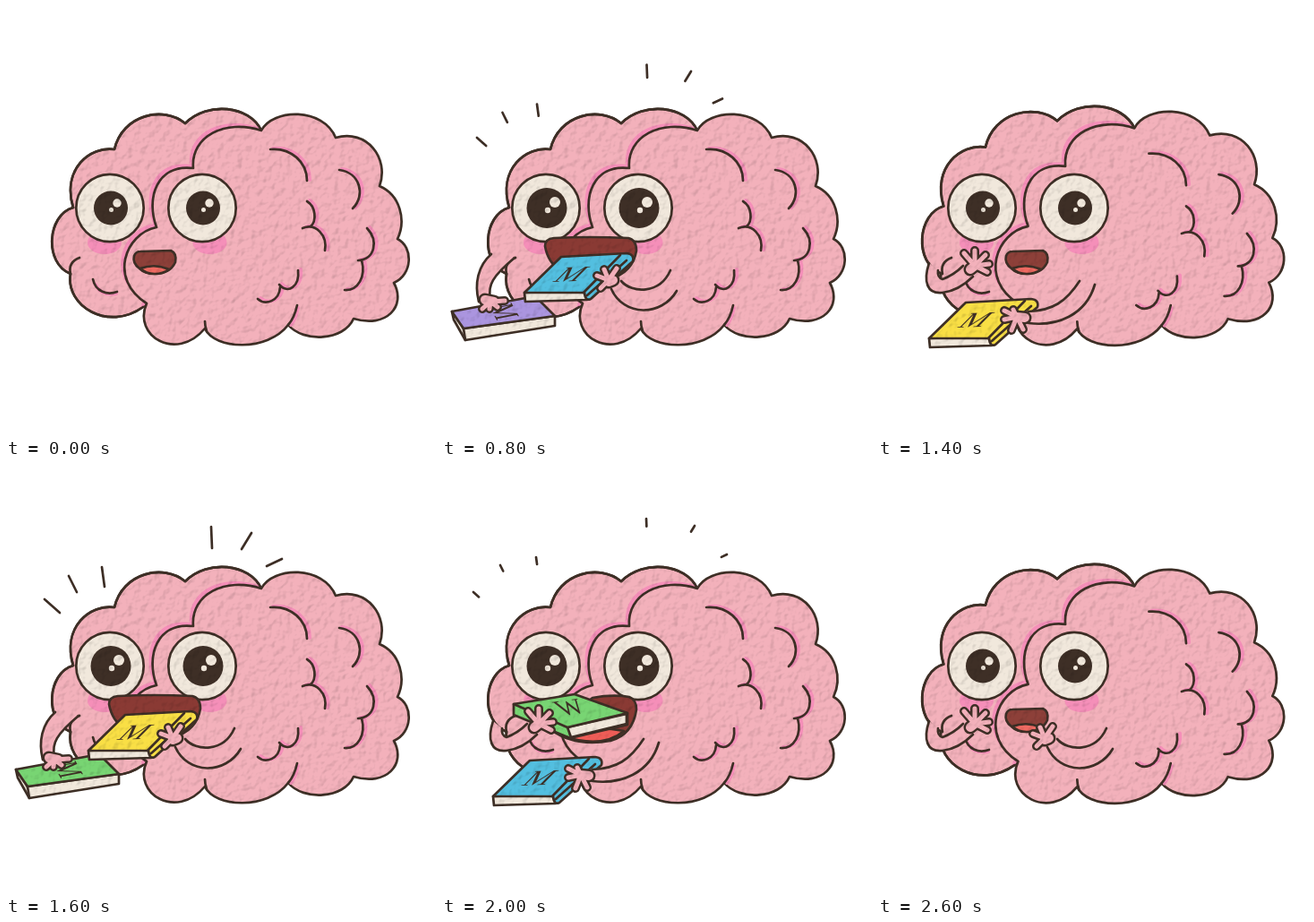
An HTML page that plays this animation: 480 by 480 pixels, repeating every 2.8 s.

```html
<!DOCTYPE html>
<html lang="en">
<head>
<meta charset="utf-8">
<title>Hungry brain</title>
<style>
  html, body { margin: 0; width: 100%; height: 100%; overflow: hidden; background: #fff; }
  svg { display: block; width: 100vw; height: 100vh; }
  path, circle { stroke-linecap: round; stroke-linejoin: round; }
  .ink { fill: none; stroke: #3e2f26; stroke-width: 2.7; }
  .shape { stroke: #3e2f26; stroke-width: 2.7; }
  .shade { fill: none; stroke: #f58fb9; stroke-width: 4; }
  text { font: 29px "Liberation Serif", serif; fill: #3e2f26; text-anchor: middle; }
</style>
</head>
<body>
<svg viewBox="0 0 480 480">
  <defs>
    <filter id="paper" filterUnits="userSpaceOnUse" x="0" y="0" width="480" height="480" color-interpolation-filters="sRGB">
      <feTurbulence type="fractalNoise" baseFrequency=".13" numOctaves="2" seed="4"/>
      <feDiffuseLighting surfaceScale=".6" diffuseConstant="1.2" lighting-color="#fff" result="light">
        <feDistantLight azimuth="225" elevation="56"/>
      </feDiffuseLighting>
      <feComposite in="SourceGraphic" in2="light" operator="arithmetic" k1="1"/>
    </filter>
    <clipPath id="backClip"><path id="backShape"/></clipPath>
  </defs>
  <g id="scene" filter="url(#paper)"></g>
</svg>
<script>
const PINK = '#f3b1bb', DARK = '#3e2f26', CREAM = '#f1e8dc', ROSE = '#f58fb9';
const BLUE = '#53bfe0', GREEN = '#78d573', LILAC = '#ab95df', YELLOW = '#f9df45';

const shape = (d, fill) => `<path class="shape" d="${d}" fill="${fill}"/>`;
const line = (d, cls = 'ink') => `<path class="${cls}" d="${d}"/>`;
const dot = (x, y, r, fill, cls = '') => `<circle class="${cls}" cx="${x}" cy="${y}" r="${r}" fill="${fill}"/>`;
const blush = x => `<ellipse cx="${x}" cy="264" rx="19" ry="13" fill="${ROSE}"/>`;
const letter = (char, matrix) => `<text transform="matrix(${matrix})" y="10">${char}</text>`;

// Brain
const BACK = `M285 139C272 111 225 106 200 131C176 111 130 121 121 160C94 156 62 182 75 225
  C46 233 42 287 72 299C66 335 114 364 153 336L230 250Z`;
const FRONT = `M209 181C168 176 156 215 168 247C133 254 114 305 157 332C141 368 190 398 222 360
  C233 384 292 386 315 356C332 376 377 374 388 349C425 360 447 335 433 309C454 300 455 269 437 260
  C447 239 440 211 417 201C428 170 403 137 368 147C354 113 298 114 285 139C245 126 206 145 209 181Z`;
const FOLDS = `M295 160C318 158 336 174 336 195M336 218C346 224 347 240 340 246M331 248
  C346 242 359 256 356 273M372 183C395 186 402 211 387 226M403 248C416 262 412 283 393 284M397 284
  C402 302 393 318 378 317M281 327C290 335 305 329 306 314M305 311C315 322 328 313 326 295`;
document.getElementById('backShape').setAttribute('d', BACK);

function brain(swollen) {
  const grow = swollen ? 'translate(200 330) scale(1.014) translate(-200 -330)' : '';
  const slide = swollen ? 'translate(6 7)' : '';
  return `<g transform="${grow}">` + shape(BACK, PINK) +
    `<g clip-path="url(#backClip)"><path d="${FRONT}" fill="${ROSE}" transform="translate(-4 -4)"/></g>` +
    line(BACK.replace('L230 250Z', '')) + shape(FRONT, PINK) +
    line('M326 337Q323 350 318 356', 'shade') + line('M325 334Q322 348 315 356M222 352Q222 357 224 363') +
    `<g transform="${slide}"><g transform="translate(3 -1)">${line(FOLDS, 'shade')}</g>${line(FOLDS)}</g></g>` +
    line('M100 311Q106 324 123 321', 'shade') + line('M82 281Q69 286 72 299M97 305C100 319 113 323 124 319');
}

// Face
function eye(x, wide) {
  return dot(x, 225.5, 37.7, CREAM, 'shape') + dot(x + 1, 225.5, wide ? 22.5 : 19, DARK) +
    (wide ? dot(x + 10, 219, 6, CREAM) + dot(x + 2, 228, 3.2, CREAM)
          : dot(x + 8, 220, 4.7, CREAM) + dot(x + 1.5, 227.5, 2.5, CREAM));
}

function mouth(kind) {
  if (!kind) return shape('M150 274L184 273Q191 276 189 286Q183 299 166 299Q155 299 149 293Q141 287 143 279Q145 274 150 274Z', '#8d4039') +
    shape('M150 293Q166 287 182 294Q175 299 166 299Q156 299 150 293Z', '#ee6a62');
  if (kind === 'left') return shape('M168 261Q190 257 209 260Q217 263 217 274Q213 302 188 309Q148 316 122 297Z', '#8a3a34') +
    shape('M135 304Q165 290 203 298Q180 318 135 304Z', '#ee5d57');
  return shape('M125 259Q165 257 208 259Q217 261 217 273Q213 298 186 305Q122 309 115 268Q115 260 125 259Z', '#8a3a34');
}

// Books
const flatBook = (color, x = 0, y = 0) => `<g transform="translate(${x} ${y})">` +
  shape('M57 371L125 369L127 379L58 381Z', CREAM) +
  shape('M57 371L98 331L171 327Q180 328 178 336L131 378Q125 381 124 371Z', color) +
  line('M164 329L123 371M171 335L127 374') + letter('M', '1.1 -.04 -.85 .85 110 350') + '</g>';
const groundBook = color => shape('M11 341L13 350L26 373L126 357V346L24 360Z', CREAM) + line('M24 360L26 373') +
  shape('M11 341L104 324L126 346L24 360Z', color) + letter('M', '.35 .62 -1.3 .25 70 341');
const bittenBook = color => shape('M80 268V280L143 306L207 291V278L150 270Z', color) +
  shape('M140 294L144 305L206 290V279Z', CREAM) +
  shape('M80 268L148 257L207 278L140 294Z', color) + letter('W', '1.05 -.14 .6 .8 142 271');

// Limbs
const stroke = (d, color, width) => `<path d="${d}" fill="none" stroke="${color}" stroke-width="${width}"/>`;
const arm = (fill, edges, palm, fingers) => `<path d="${fill}" fill="${PINK}"/>` + line(edges) +
  stroke(fingers, DARK, 10) + stroke(palm, DARK, 15) + stroke(fingers, PINK, 5) + stroke(palm, PINK, 10);
const fan = (x, y, tips) => tips.map(tip => `M${x} ${y}L${tip}`).join('');

const ARMS = {
  leftUp: arm('M57 287C50 308 55 322 72 320C88 318 98 310 108 301L96 289C88 297 80 303 71 305Q66 303 67 295Z',
    'M57 287C50 308 55 322 72 320C88 318 98 310 106 302M95 290C88 297 80 302 72 305Q66 303 67 295',
    'M103 294L108 290', fan(108, 290, ['96 276', '108 273', '120 278', '124 288', '122 297'])),
  leftDown: arm('M55 277C40 290 36 310 41 332L55 328C51 312 56 302 80 281Z',
    'M55 277C40 290 36 310 41 330M54 326C51 312 56 302 81 281',
    'M48 328L58 330', fan(54, 330, ['45 338', '53 338', '62 336', '70 329'])),
  rightUp: arm('M262 318C245 347 203 347 187 315L198 304C212 321 243 322 255 295Z',
    'M262 318C245 347 203 347 189 316M255 295C243 322 212 321 200 307',
    'M186 308L191 306', fan(186, 306, ['173 301', '177 315', '181 294', '195 293'])),
  rightLow: arm('M225 307C210 330 195 340 164 341L166 355C200 358 232 345 242 311Z',
    'M225 307C210 330 195 340 168 341M242 311C232 345 200 358 168 354',
    'M154 347L164 348', fan(155, 347, ['141 340', '141 350', '149 362', '162 361', '151 339']))
};
const BOOKS = {
  leftDown: groundBook,
  leftEat: bittenBook,
  rightLow: color => flatBook(color),
  rightEat: color => flatBook(color, 35, -51)
};

function limb([pose, color]) {
  return (color ? BOOKS[pose](color) : '') + ARMS[pose.replace('Eat', 'Up')];
}

// Excitement ticks: outer end, vector to inner end, drift per stage
const TICKS = [
  [43, 151, 17, 15, -4, -4], [70, 125, 9, 18, -2.5, -6], [107, 115, 3, 22, -1, -5.5],
  [229, 70, 1, 24, -.5, -4.5], [274, 77, -11, 18, 4, -4], [308, 106, -17, 8, 5, -2.5]
];
function ticks(stage) {
  if (!stage) return '';
  const k = stage - 1, size = .6 ** k;
  return line(TICKS.map(([x, y, vx, vy, dx, dy]) =>
    `M${x + k * dx} ${y + k * dy}l${vx * size} ${vy * size}`).join(''));
}

// One entry per 200 ms: limbs with their books, tick stage
const STEPS = [
  [[], 0],
  [[['leftDown', GREEN], ['rightLow']], 0],
  [[['leftEat', GREEN], ['rightLow', BLUE]], 0],
  [[['leftUp'], ['rightLow', BLUE]], 1],
  [[['leftDown', LILAC], ['rightEat', BLUE]], 2],
  [[['leftDown', LILAC], ['rightUp']], 3],
  [[['leftEat', LILAC], ['rightLow', YELLOW]], 4],
  [[['leftUp'], ['rightLow', YELLOW]], 0],
  [[['leftDown', GREEN], ['rightEat', YELLOW]], 1],
  [[['leftDown', GREEN], ['rightUp']], 2],
  [[['leftEat', GREEN], ['rightLow', BLUE]], 3],
  [[['leftUp'], ['rightLow', BLUE]], 4],
  [[['leftUp'], ['rightEat', BLUE]], 4],
  [[['leftUp'], ['rightUp']], 0]
];

function draw(step) {
  const [limbs, stage] = STEPS[step];
  const eating = limbs.find(([pose]) => pose.endsWith('Eat'));
  const bite = eating && eating[0].replace('Eat', '');
  return brain(step > 2 && step % 2) + blush(110) + blush(227.5) +
    eye(116, bite) + eye(219, bite) + mouth(bite) + limbs.map(limb).join('') + ticks(stage);
}

const scene = document.getElementById('scene');
let shown = -1;
function tick() {
  const step = Math.floor(performance.now() % 2800 / 200);
  if (step !== shown) scene.innerHTML = draw(shown = step);
  requestAnimationFrame(tick);
}
tick();
</script>
</body>
</html>
```
